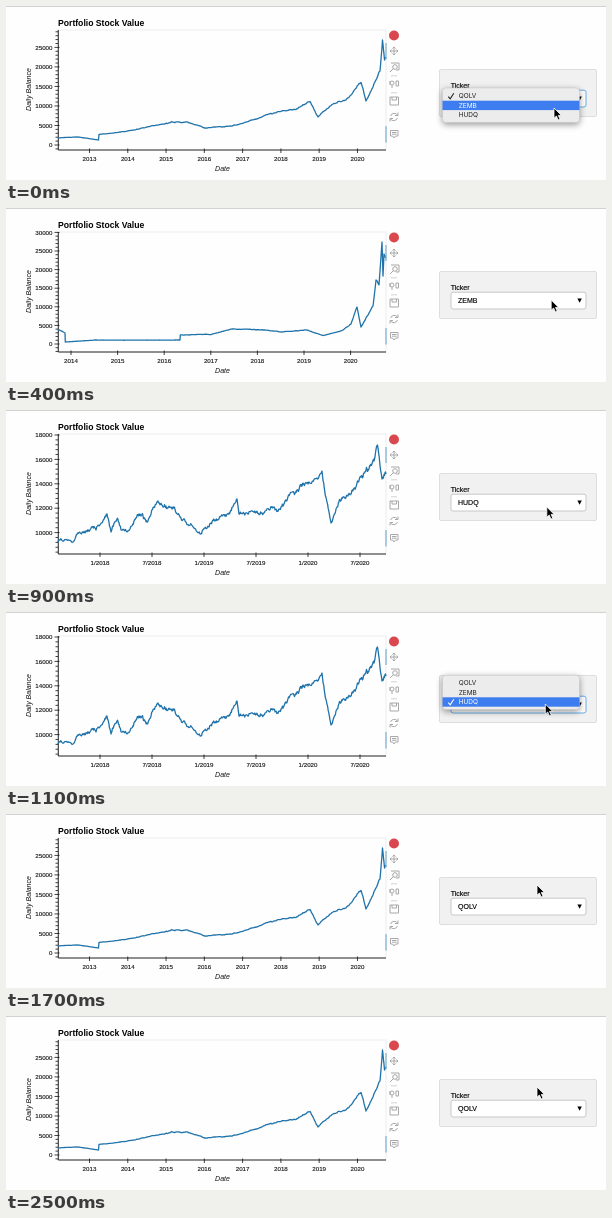
Recreate the animation shown at these times as an HTML page. Size 600 by 174 pixels, loop 2700 ms.

```html
<!DOCTYPE html>
<html lang="en">
<head>
<meta charset="utf-8">
<title>Portfolio Stock Value</title>
<style>
html, body { margin: 0; width: 100%; height: 100%; overflow: hidden; background: #fefefe; }
svg { display: block; width: 600px; height: 174px; font-family: "Liberation Sans", Arial, sans-serif; }
.menu { font-family: Inter, sans-serif; font-size: 6.5px; }
.menu rect:first-child { filter: drop-shadow(0 2px 3px rgba(0, 0, 0, .4)); }
.tick { font-size: 6.2px; fill: #111; stroke: #111; stroke-width: .12px; }
.label { font-size: 7px; font-style: italic; fill: #111; }
.form { font-size: 7px; fill: #000; stroke: #000; stroke-width: .15px; }
.icons { fill: none; stroke: #a8a8a8; stroke-width: 1; }
</style>
</head>
<body>
<svg id="stage" viewBox="0 0 600 174"></svg>
<script>
const stage = document.getElementById('stage');

function add(parent, tag, attrs = {}, text) {
  const node = document.createElementNS('http://www.w3.org/2000/svg', tag);
  for (const key in attrs) node.setAttribute(key, attrs[key]);
  if (text !== undefined) node.textContent = text;
  parent.appendChild(node);
  return node;
}
const show = (node, on) => node.setAttribute('visibility', on ? 'visible' : 'hidden');
const range = (count, make) => Array.from({ length: count }, (_, i) => make(i));

function seeded(seed) {
  return () => (seed = (seed * 16807) % 2147483647) / 2147483647;
}

const tickers = ['QOLV', 'ZEMB', 'HUDQ'];

// y0 is the height of the lowest value, unit the height of one step.
const charts = [
  {
    y0: 139, unit: 19.52, step: 5000, from: 0, to: 25000,
    x0: 83.5, dx: 38.28, dates: range(8, i => 2013 + i),
    keys: [[52, 132], [72, 131], [92.5, 134], [93, 128.5], [120, 125.4], [149, 119.5], [165, 116], [181, 116],
      [199, 122], [226, 120], [250, 113], [268, 107], [290, 103.5], [304, 95.5], [312, 111], [327, 98],
      [340, 94], [355, 76.5], [360, 95], [374, 65], [376.5, 34], [378.5, 54], [380, 51]]
  },
  {
    y0: 136, unit: 18.6, step: 5000, from: 0, to: 30000,
    x0: 65, dx: 46.6, dates: range(7, i => 2014 + i),
    keys: [[52, 121.5], [59, 125], [59.3, 134], [90, 132], [174, 132], [174.3, 127], [205, 126.5], [226, 121],
      [258, 122], [276, 124], [301, 122], [317, 127.5], [336, 122.5], [345, 116], [351, 99], [355, 119],
      [367, 98], [370, 72], [373, 77], [376, 34], [377, 68], [378, 46], [380, 50]]
  },
  {
    y0: 122.6, unit: 24.4, step: 2000, from: 10000, to: 18000,
    x0: 94, dx: 52, dates: range(6, i => `${i % 2 ? 7 : 1}/${2018 + (i >> 1)}`),
    keys: [[52, 132], [67, 132], [70, 126], [90, 120], [101, 104], [105, 122], [111, 109], [115, 120],
      [124, 119], [133, 104], [141, 112], [152, 91], [168, 97], [180, 112], [195, 124], [205, 113],
      [222, 104], [231, 89], [233, 104], [256, 103], [275, 97], [286, 82], [302, 74], [316, 61],
      [325, 113], [334, 90], [352, 71], [368, 51], [371.5, 35], [376, 69], [380, 64]]
  }
];

// Splits each stretch at its middle, with a random shift in proportion to the price.
function pricePath({ keys, y0, unit, step, from }, seed) {
  const random = seeded(seed);
  const zero = y0 + from / step * unit;
  function between([xa, ya], [xb, yb]) {
    const span = xb - xa;
    if (span < 1) return [[xb, yb]];
    const y = (ya + yb) / 2;
    const shift = (random() - 0.5) * 0.022 * (zero - y) * span ** 0.25;
    const middle = [(xa + xb) / 2, y + shift];
    return [...between([xa, ya], middle), ...between(middle, [xb, yb])];
  }
  const points = keys.slice(1).flatMap((key, i) => between(keys[i], key));
  return 'M' + [keys[0], ...points].map(p => p.map(v => v.toFixed(2))).join('L');
}

function drawChart(chart, index) {
  const g = add(stage, 'g');
  const { y0, unit, step, from, to, x0, dx, dates } = chart;
  const minor = unit / 5;
  let ticks = '';
  for (let n = -Math.floor((144 - y0) / minor); y0 - n * minor > 24; n++) {
    ticks += `M${n % 5 ? '49.5' : '48.5'} ${y0 - n * minor}H${n % 5 ? 52 : 53.5}`;
  }
  for (let v = from; v <= to; v += step) {
    const y = y0 - (v - from) / step * unit + 2.2;
    add(g, 'text', { x: 46.5, y, 'text-anchor': 'end', class: 'tick' }, v);
  }
  dates.forEach((date, i) => {
    const x = x0 + dx * i;
    ticks += `M${x} 142.5V147`;
    add(g, 'text', { x, y: 155, 'text-anchor': 'middle', class: 'tick' }, date);
  });
  add(g, 'path', { d: ticks, stroke: '#111', 'stroke-width': 0.8 });
  add(g, 'path', {
    d: pricePath(chart, 71 + index * 1300), fill: 'none', stroke: '#1f73aa',
    'stroke-width': 1.3, 'stroke-linejoin': 'round'
  });
  return g;
}

function drawToolbar() {
  add(stage, 'circle', { cx: 388, cy: 29.5, r: 5, fill: '#d9484f' });
  const g = add(stage, 'g', { class: 'icons' });
  const icons = [
    'M384 45H392M388 41V49M385.5 43.5L384 45L385.5 46.5M390.5 43.5L392 45L390.5 46.5M386.5 42.5L388 41L389.5 42.5M386.5 47.5L388 49L389.5 47.5',
    'M385 57H393V64H390M387.5 62.5L384 66',
    'M386 79V82M390 75H392.5V80H390ZM384 75V79',
    'M384 91H392.5V99H384ZM386 91V94H390.5V91',
    'M384.5 110A4 4 0 0 1 391.5 109M392 106.5V109.5H389M391.5 112A4 4 0 0 1 384.5 113M384 115.5V112.5H387',
    'M384.5 124.5H392V130H389.5L388 132L386.5 130H384.5ZM386 126.5H390.5M386 128.2H390.5'
  ];
  icons.forEach(d => add(g, 'path', { d }));
  add(g, 'circle', { cx: 389, cy: 61, r: 2.3 });
  add(g, 'circle', { cx: 386, cy: 77, r: 2 });
  add(g, 'path', { d: 'M385 69.8H391M385 86.8H391', opacity: 0.5 });
  add(stage, 'path', { d: 'M380 37V53M380 120V136.5', stroke: '#79aecf', 'stroke-width': 1.2 });
}

add(stage, 'rect', { width: 600, height: 1, fill: '#d2d2d2' });
add(stage, 'text', { x: 52, y: 19.6, 'font-size': 8.65, 'font-weight': 700 }, 'Portfolio Stock Value');
add(stage, 'rect', { x: 52, y: 24, width: 328, height: 120, fill: 'none', stroke: '#e5e5e5', 'stroke-width': 0.7 });
add(stage, 'path', { d: 'M52.3 24V144H380', fill: 'none', stroke: '#111', 'stroke-width': 0.9 });
add(stage, 'text', { transform: 'translate(25 83.5) rotate(-90)', 'text-anchor': 'middle', class: 'label' }, 'Daily Balance');
add(stage, 'text', { x: 216.5, y: 164.8, 'text-anchor': 'middle', class: 'label' }, 'Date');
const chartGroups = charts.map(drawChart);
drawToolbar();

add(stage, 'rect', { x: 433.5, y: 63.5, width: 157, height: 47, rx: 1.5, fill: '#f1f1f1', stroke: '#dedede' });
add(stage, 'text', { x: 444.8, y: 81.6, class: 'form' }, 'Ticker');
const box = add(stage, 'rect', { x: 445, y: 84.2, width: 135, height: 16.8, rx: 2, fill: '#fff' });
const value = add(stage, 'text', { x: 452, y: 95.2, class: 'form' });
add(stage, 'path', { d: 'M571.4 90.6H575.8L573.6 94.8Z' });

const rowHeight = 9.4;
const rowsTop = 3.3;
const menu = add(stage, 'g', { class: 'menu' });
add(menu, 'rect', { x: 436.5, width: 137, height: 34.4, rx: 3.5, fill: '#ececec', stroke: '#c4c4c4', 'stroke-width': 0.5 });
const bar = add(menu, 'rect', { x: 436.5, width: 137, height: rowHeight, fill: '#3d7df0' });
const rows = tickers.map((name, i) => add(menu, 'text', { x: 452.7, y: 10.2 + i * rowHeight }, name));
const check = add(menu, 'path', { d: 'M442.3 .6L444.2 2.9L447.8 -2.8', fill: 'none', 'stroke-width': 1.1 });

const cursor = add(stage, 'path', {
  d: 'M0 0V10.2L2.4 8L4.2 12L6 11.2L4.3 7.4H7.4Z',
  stroke: '#fff', 'stroke-width': 0.8, 'stroke-linejoin': 'round'
});

const loop = 2700;
const tick = 100;
// The menu opens on one chart and closes on the next.
const picks = [
  { open: 0, close: 200 },
  { open: 500, close: 900 },
  { open: 1100, close: 1600 }
];
const pointer = [
  { t: 0, x: 548, y: 102 },
  { t: 400, x: 545.2, y: 92 },
  { t: 700, x: 542.3, y: 102 },
  { t: 1100, x: 539.3, y: 92 },
  { t: 1500, x: 531, y: 71 },
  { t: loop, x: 531, y: 71 }
];

function pointerAt(time) {
  const next = pointer.findIndex(p => p.t > time);
  const a = pointer[next - 1], b = pointer[next];
  const k = (time - a.t) / (b.t - a.t);
  return { x: a.x + (b.x - a.x) * k, y: a.y + (b.y - a.y) * k };
}

function render(time) {
  const now = Math.floor(time / tick) * tick;
  const { x, y } = pointerAt(now);
  const chart = picks.filter(p => p.close <= now).length % charts.length;
  const open = picks.some(p => p.open <= now && now < p.close);
  const menuTop = 82 - chart * rowHeight;
  const hover = Math.floor((y - menuTop - rowsTop) / rowHeight);

  chartGroups.forEach((g, i) => show(g, i === chart));
  value.textContent = tickers[chart];
  box.setAttribute('stroke', open ? '#66afe9' : '#c8c8c8');
  show(menu, open);
  menu.setAttribute('transform', `translate(0 ${menuTop})`);
  bar.setAttribute('y', rowsTop + hover * rowHeight);
  rows.forEach((row, i) => row.setAttribute('fill', i === hover ? '#fff' : '#222'));
  check.setAttribute('transform', `translate(0 ${8 + chart * rowHeight})`);
  check.setAttribute('stroke', chart === hover ? '#fff' : '#222');
  cursor.setAttribute('transform', `translate(${x} ${y})`);
}

const start = performance.now();
function frame() {
  render((performance.now() - start) % loop);
  requestAnimationFrame(frame);
}
frame();
</script>
</body>
</html>
```
